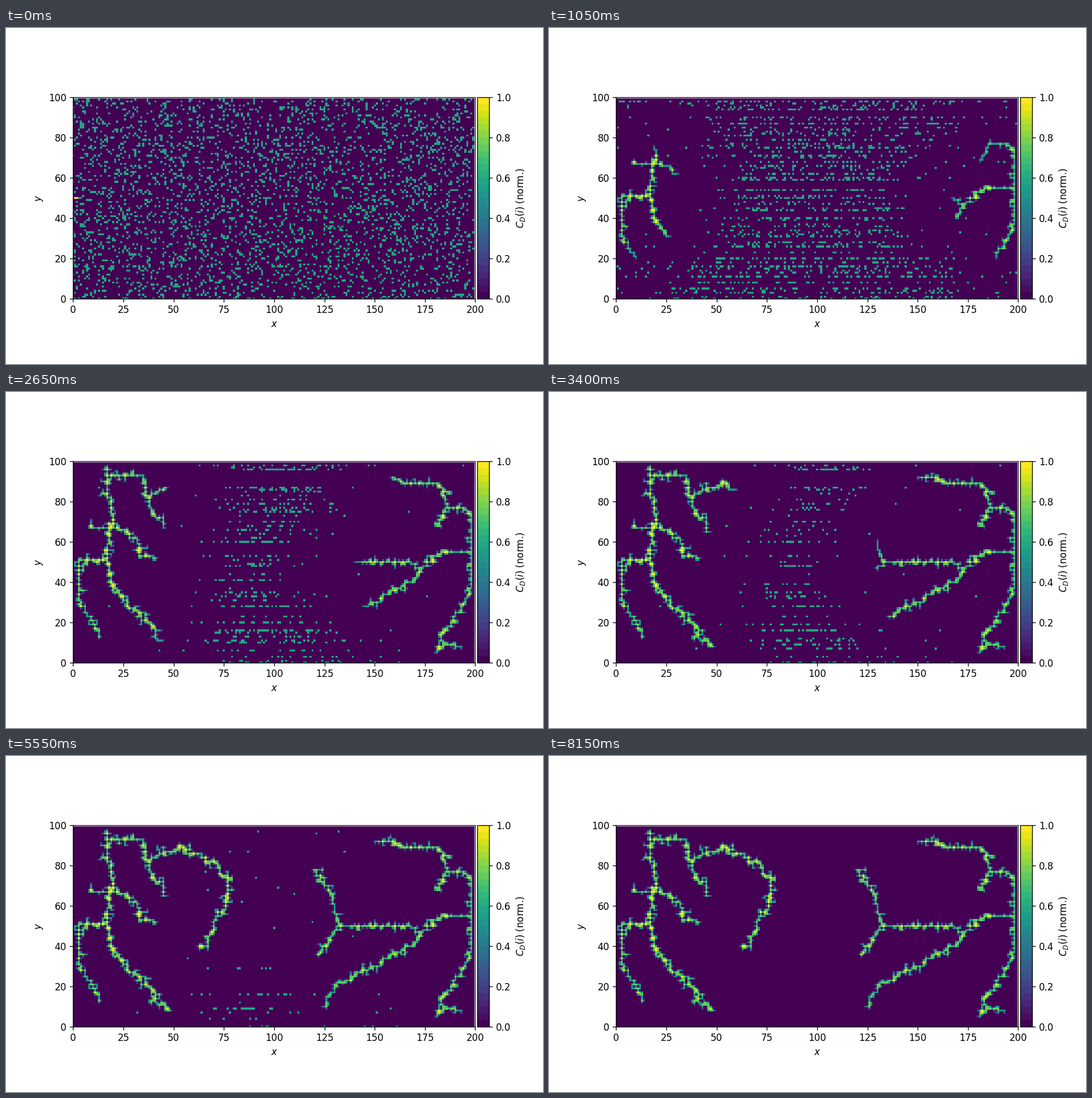
Animation of 947 by 592 pixels, one loop 10000 ms. Source, as a matplotlib script:

```python
import numpy as np
import matplotlib.pyplot as plt
from matplotlib.animation import FuncAnimation
from mpl_toolkits.axes_grid1 import make_axes_locatable

W, H = 200, 100
FRAMES, LAST = 200, 163
DPI = 120
SIDES = [(1, 0), (-1, 0), (0, 1), (0, -1)]
rng = np.random.default_rng(12)

# Frame number at which each lattice site joins a cluster
birth = np.full((H, W), np.inf)

# Points the main branches reach, in the order they are laid out
LEFT_TIPS = [(17, 51), (20, 74), (15, 84), (17, 98), (32, 93), (32, 62),
             (38, 78), (53, 90), (45, 68), (79, 74), (40, 51), (76, 58),
             (63, 40), (4, 28), (13, 15), (20, 38), (32, 25), (47, 8), (8, 68)]
RIGHT_TIPS = [(198, 75), (198, 43), (187, 55), (186, 78), (182, 88), (150, 92),
              (181, 68), (168, 40), (168, 50), (134, 50), (121, 78), (121, 36),
              (155, 34), (140, 25), (190, 24), (181, 5), (125, 10), (193, 8)]


def staircase(start, end):
    """Random lattice path, one site at a time."""
    (x, y), (tx, ty) = start, end
    while (x, y) != (tx, ty):
        dx, dy = tx - x, ty - y
        if rng.random() * (abs(dx) + abs(dy)) < abs(dx):
            x += int(np.sign(dx))
        else:
            y += int(np.sign(dy))
        yield x, y


def grow(seed, tips):
    """Join each tip to the nearest site; the front slows as it widens."""
    for tip in tips:
        ys, xs = np.nonzero(np.isfinite(birth))
        near = np.argmin((xs - tip[0]) ** 2 + (ys - tip[1]) ** 2)
        root = int(xs[near]), int(ys[near])
        when = birth[root[1], root[0]]
        for x, y in staircase(root, tip):
            radius = np.hypot(x - seed[0], y - seed[1])
            when = max(when, np.ceil(85 * (radius / 80) ** 1.5))
            birth[y, x] = min(birth[y, x], when)


def thicken(count):
    """Attach small twigs to randomly chosen cluster sites."""
    sites = [(int(x), int(y)) for y, x in np.argwhere(np.isfinite(birth))]
    while count:
        x, y = sites[rng.integers(len(sites))]
        dx, dy = SIDES[rng.integers(4)]
        u, v = x + dx, y + dy
        if not (1 <= u < W - 1 and 2 <= v < H - 1) or np.isfinite(birth[v, u]):
            continue
        touching = sum(np.isfinite(birth[v + b, u + a]) for a, b in SIDES)
        if touching > 2 or (touching == 2 and rng.random() < 0.5):
            continue
        birth[v, u] = min(birth[y, x] + rng.integers(1, 6), LAST)
        sites.append((u, v))
        count -= 1


birth[50, 1:3] = 0
birth[50, 198] = 1
grow((2, 50), LEFT_TIPS)
grow((198, 50), RIGHT_TIPS)
thicken(850)


def simulate_walkers(count=3500):
    """Rows of walkers drift together; those close to a cluster vanish."""
    x, y = rng.integers(0, W, count), rng.integers(0, H, count)
    luck = rng.exponential(8, count)
    rows = np.arange(H)
    row_luck = rng.normal(0, 4, H) + 8 * np.exp(-((rows - 12) / 14) ** 2)
    gy, gx = np.mgrid[:H, :W]
    clearance = np.full((H, W), 1e6)
    history = [(x, y)]
    for frame in range(1, LAST + 1):
        for cy, cx in np.argwhere(birth == frame):
            np.minimum(clearance, np.hypot(gx - cx, gy - cy), out=clearance)
        dx = rng.integers(-2, 3, H)
        dy = rng.choice([-1, 0, 1], H, p=[0.015, 0.97, 0.015])
        x, y = x + dx[y], y + dy[y]
        x = W - 1 - abs(W - 1 - abs(x))
        y = H - 1 - abs(H - 1 - abs(y))
        gap = clearance[y, x]
        score = np.where(gap < 2, -1e3, gap + luck + row_luck[y])
        alive = int(count * np.exp(-frame / 42) * (1 - frame / LAST))
        keep = np.argsort(-score)[:alive]
        keep = keep[score[keep] > -1e3]
        x, y, luck = x[keep], y[keep], luck[keep]
        history.append((x, y))
    return history


walkers = simulate_walkers()


def field(frame):
    """Free walkers share one value, cluster sites show their degree."""
    frame = min(frame, LAST)
    cluster = birth <= frame
    p = np.pad(cluster.astype(int), 1)
    degree = p[:-2, 1:-1] + p[2:, 1:-1] + p[1:-1, :-2] + p[1:-1, 2:]
    values = np.zeros((H, W))
    x, y = walkers[frame]
    values[y, x] = 0.58
    values[cluster] = degree[cluster] / degree[cluster].max()
    return values


plt.rcParams["font.family"] = "DejaVu Sans"
fig, ax = plt.subplots(figsize=(947 / DPI, 592 / DPI), dpi=DPI)
fig.subplots_adjust(bottom=0.1085, top=0.88)
image = ax.imshow(field(0), origin="lower", vmin=0, vmax=1,
                  cmap=plt.get_cmap("viridis", 30), interpolation="nearest")
ax.set(xlim=(0, W), ylim=(0, H), xlabel="$x$", ylabel="$y$",
       xticks=range(0, W + 1, 25), yticks=range(0, H + 1, 20))
cax = make_axes_locatable(ax).append_axes("right", size="3%", pad=0.03)
fig.colorbar(image, cax=cax, label="$C_D(i)$ (norm.)")


def update(frame):
    image.set_data(field(frame))
    return [image]


anim = FuncAnimation(fig, update, frames=FRAMES, interval=50,
                     repeat=True, repeat_delay=0)
plt.show()
```
